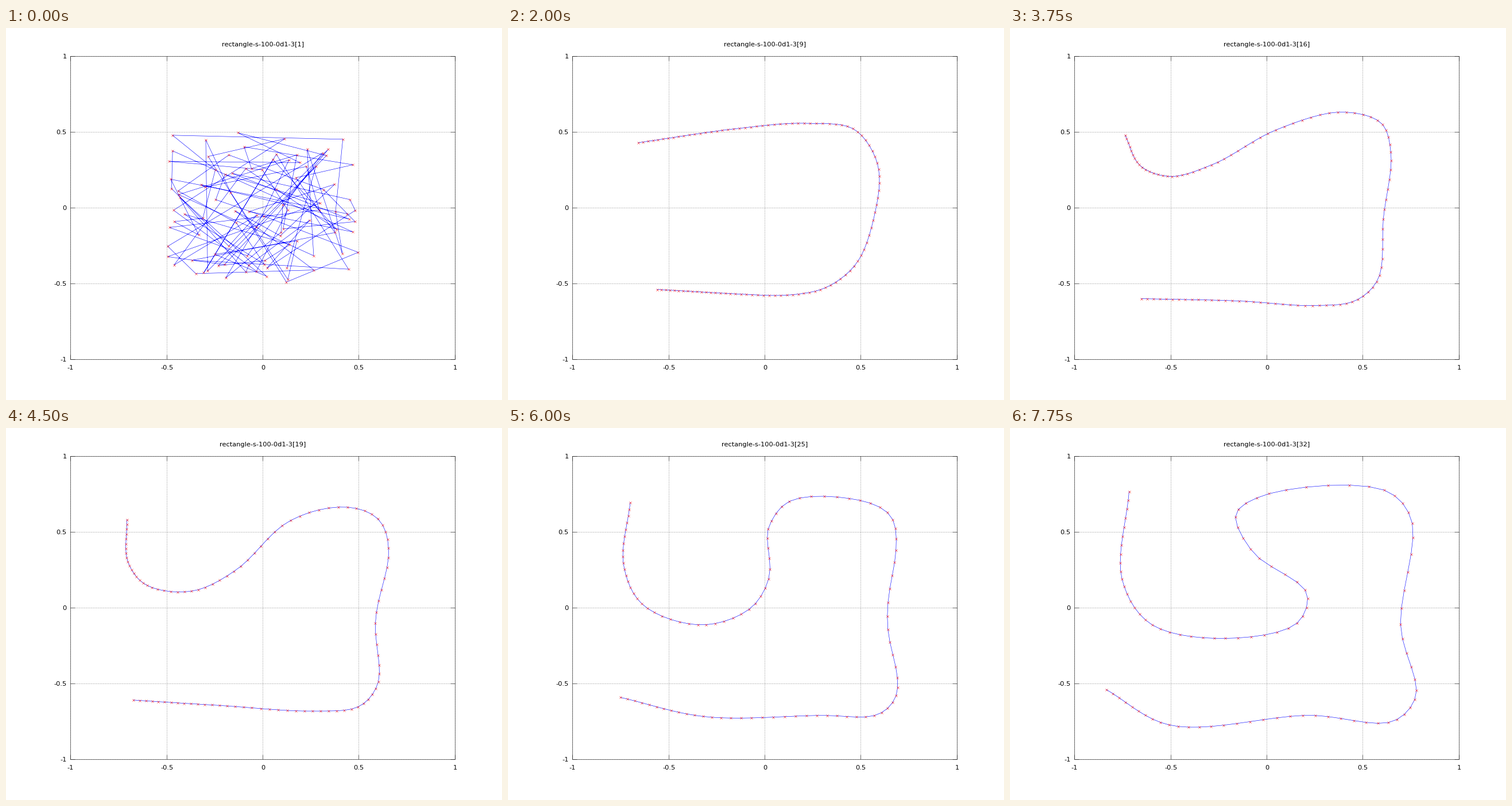
A matplotlib script for the animation above (8000 ms loop, 864 px wide and 648 px high).

```python
import numpy as np
import matplotlib.pyplot as plt
from matplotlib.animation import FuncAnimation

W, H, DPI = 864, 648, 72
FRAMES, INTERVAL = 32, 250
NODES = 100
LEFT, RIGHT, TOP, BOTTOM = 112, 782, 49, 577
CENTER = np.array([(LEFT + RIGHT) / 2, (TOP + BOTTOM) / 2])
TICK = 8

plt.rcParams["font.family"] = "DejaVu Sans"
plt.rcParams["font.size"] = 11.4


def chain(*points):
    """Smooth curve through a few bends; nodes crowd at tight bends and both ends."""
    p = np.array(points, float)
    chord = np.hypot(*np.diff(p, axis=0).T)
    s = np.append(0, np.cumsum(chord ** 0.6))
    slope = np.gradient(p, s, axis=0)
    u = np.linspace(0, 1, NODES)
    t = s[-1] * (u - 0.3 * np.sin(2 * np.pi * u) / (2 * np.pi))
    k = np.clip(np.searchsorted(s, t, side="right") - 1, 0, len(p) - 2)
    h = (s[k + 1] - s[k])[:, None]
    v = (t - s[k])[:, None] / h
    w = v * v * (3 - 2 * v)
    return (p[k] * (1 - w) + p[k + 1] * w
            + h * v * (1 - v) * ((1 - v) * slope[k] - v * slope[k + 1]))


def scatter():
    rng = np.random.default_rng(7)
    return CENTER + rng.uniform(-0.5, 0.5, (NODES, 2)) * [335, 264]


# Bends of the chain, in stage pixels, as it unfolds
early = chain((251, 197), (402, 181), (490, 177), (580, 186), (635, 250),
              (606, 361), (530, 441), (411, 465), (282, 455))
hook = chain((208, 201), (405, 169), (542, 157), (625, 170), (656, 230),
             (645, 333), (616, 431), (567, 465), (494, 471), (371, 459),
             (242, 455))
dip = chain((200, 186), (226, 239), (277, 258), (353, 237), (463, 177),
            (580, 146), (647, 166), (663, 217), (650, 330), (640, 438),
            (602, 474), (533, 483), (398, 475), (228, 471))
wave = chain((217, 141), (200, 228), (218, 281), (306, 314), (385, 279),
             (463, 169), (576, 126), (650, 144), (669, 192), (639, 324),
             (658, 446), (631, 489), (540, 499), (350, 487), (217, 475))
loop = chain((209, 121), (202, 247), (246, 326), (363, 364), (452, 337),
             (478, 287), (429, 181), (438, 129), (554, 111), (667, 126),
             (691, 179), (671, 333), (696, 464), (665, 501), (559, 501),
             (340, 514), (179, 464))
final = chain((207, 110), (195, 264), (242, 339), (371, 366), (502, 337),
              (517, 289), (422, 215), (393, 149), (438, 118), (659, 111),
              (698, 157), (680, 346), (706, 468), (670, 509), (522, 500),
              (274, 516), (167, 455))
small = CENTER + (early - CENTER) * 0.88

# The tangle snaps to a small arc at once, then drifts from shape to shape
times = [1, 4, 11, 15, 20, 27, 31]
shapes = [small, early, hook, dip, wave, loop, final]


def nodes_at(i):
    if i < times[0]:
        return scatter()
    k = min(np.searchsorted(times, i, side="right") - 1, len(times) - 2)
    f = (i - times[k]) / (times[k + 1] - times[k])
    return shapes[k] * (1 - f) + shapes[k + 1] * f


fig = plt.figure(figsize=(W / DPI, H / DPI), dpi=DPI, facecolor="white")
ax = fig.add_axes([0, 0, 1, 1])
ax.set_xlim(-0.5, W - 0.5)
ax.set_ylim(H - 0.5, -0.5)
ax.axis("off")


def rule(x, y, **style):
    ax.plot(x, y, color="black", lw=0.5, solid_capstyle="butt", snap=False,
            **style)


def label(x, y, text, ha="center"):
    return ax.text(x, y - 0.5, text, ha=ha, va="baseline")


dots = dict(ls=(0, (2, 4)), zorder=1)
for k, name in enumerate(["-1", "-0.5", "0", "0.5", "1"]):
    x = round(LEFT + (RIGHT - LEFT) * k / 4)
    y = round(BOTTOM - (BOTTOM - TOP) * k / 4)
    rule([x, x], [TOP, BOTTOM], **dots)
    rule([LEFT, RIGHT], [y, y], **dots)
    for edge, step in ((TOP, TICK), (BOTTOM, -TICK)):
        rule([x, x], [edge, edge + step], zorder=4)
    for edge, step in ((LEFT, TICK), (RIGHT, -TICK)):
        rule([edge, edge + step], [y, y], zorder=4)
    label(x, 595, name)
    label(105, y + 4, name, ha="right")
rule([LEFT, RIGHT, RIGHT, LEFT, LEFT], [TOP, TOP, BOTTOM, BOTTOM, TOP], zorder=4)

line, = ax.plot([], [], color="blue", lw=0.6, zorder=2)
marks, = ax.plot([], [], "x", color="red", ms=4.6, mew=0.5, snap=False, zorder=3)
title = label(CENTER[0], 32, "")


def draw(i):
    x, y = nodes_at(i).T
    line.set_data(x, y)
    marks.set_data(x, y)
    title.set_text(f"rectangle-s-100-0d1-3[{i + 1}]")
    return line, marks, title


anim = FuncAnimation(fig, draw, frames=FRAMES, interval=INTERVAL,
                     repeat=True, repeat_delay=0)
plt.show()
```
